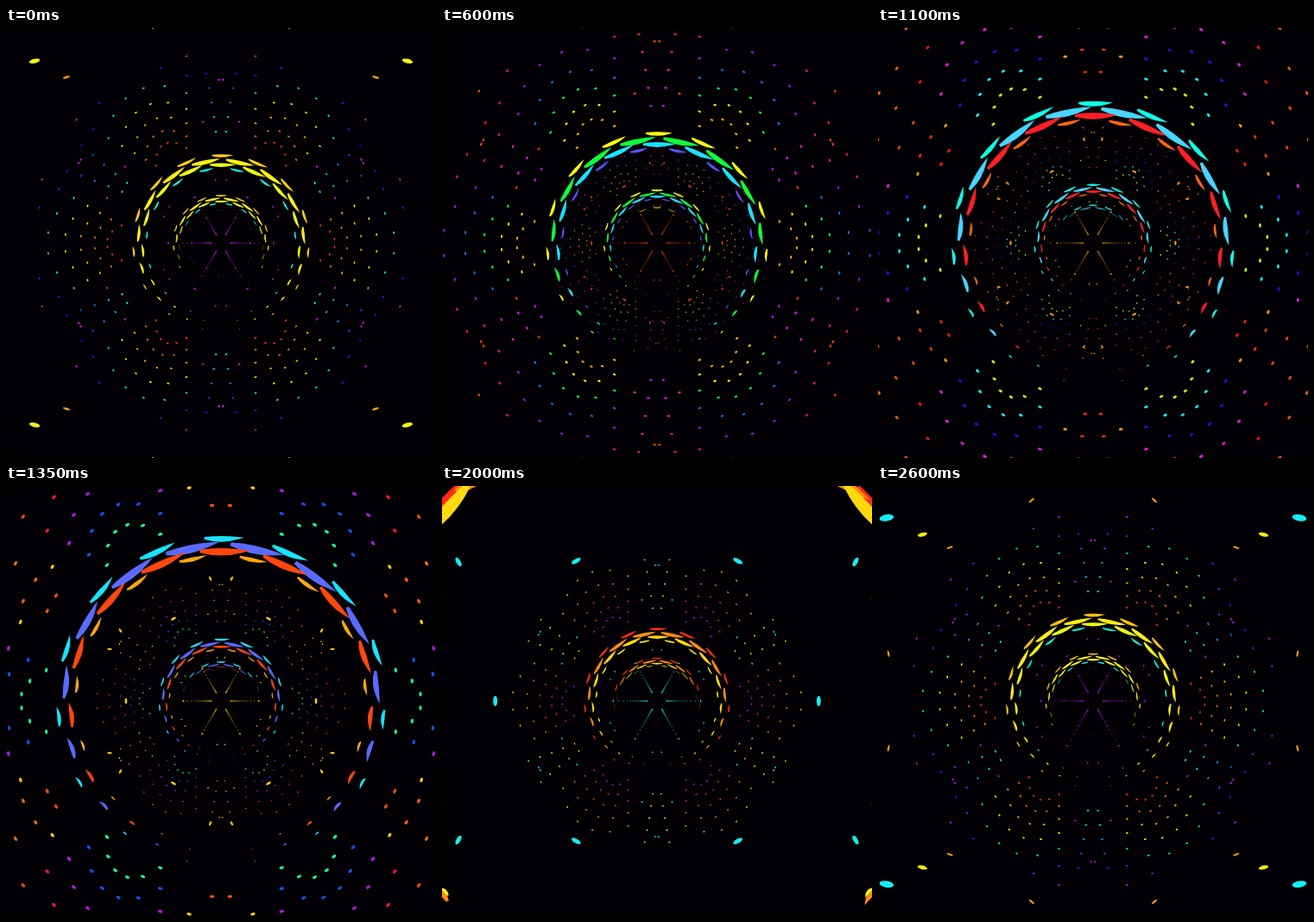
Animation of 498 by 498 pixels, one loop 2650 ms. Source, as an HTML page with a canvas:

```html
<!DOCTYPE html>
<html lang="en">
<head>
<meta charset="utf-8">
<title>Neon tunnel</title>
<style>
html, body { margin: 0; width: 100%; height: 100%; overflow: hidden; background: #020004; }
canvas { display: block; width: 498px; height: 498px; }
</style>
</head>
<body>
<canvas id="stage" width="498" height="498"></canvas>
<script>
const ctx = document.getElementById('stage').getContext('2d');
const LOOP = 2650, STEP = 50, MID = 249, RAD = Math.PI / 180;
const clamp = v => Math.max(0, Math.min(1, v));
const zoom = (far, dist) => (far / dist) ** .9;

// Key points: [ms, hue]
const ringHues = [[0, 48], [800, 66], [1100, 174], [1700, 205], [1860, 358], [2650, 408]];
const dotHues = [[0, 292], [350, 358], [1100, 396], [1600, 420], [2000, 542], [2650, 652]];

function hueAt(keys, t) {
  const i = keys.findIndex(k => k[0] > t);
  const [t0, h0] = keys[i - 1], [t1, h1] = keys[i];
  return h0 + (h1 - h0) * (t - t0) / (t1 - t0);
}
const wrap = t => ((t % LOOP) + LOOP) % LOOP;
const dotColour = t => `hsl(${hueAt(dotHues, wrap(t))} 92% 52%)`;
function ringColour(time) {
  const t = wrap(time);
  const pale = Math.exp(-(((t - 1620) / 170) ** 2));
  return `hsl(${hueAt(ringHues, t)} 100% ${53 + 22 * pale}%)`;
}

// Four nested layers, alternately offset by half a dash.
const rings = Array.from({ length: 4 }, (_, i) => {
  const bell = Math.sin(Math.PI * (i + .45) / 3.6);
  return {
    r: 102 * .947 ** i, far: 2712 - 43 * i, first: 12 * (i % 2),
    span: 8 + 9.5 * bell, weight: .026 + .024 * bell, lead: 380 * i
  };
});

// r: radius at time 0; far: distance at time 0; born: distance where it appears.
const dots = [];
function addDot(r, far, angle, lag, opts = {}) {
  dots.push({ r, far, angle, lag, len: 8600, wide: 5200, tilt: 0, born: 5500, ...opts });
}

// Petals: curved rows across each arm
for (let row = 0; row < 7; row++) {
  const r = 220 * .9 ** row, edge = 30 - Math.asin(40 / r) / RAD;
  const count = Math.min(row + 1, 3), born = row < 2 ? 3500 : 5500;
  for (let i = 0; i < count; i++) {
    const f = 1 - .4 * i;
    addDot(r * (1.13 - .13 * f * f), 2900, edge * f, 350 * row, { born });
  }
}

// Pairs between the petals
for (let i = 0; i < 5; i++) addDot(197 - 17 * i, 2900, 25 + .6 * i, 300 + 90 * i);
addDot(189, 2860, 29.3, 0);
addDot(142, 2900, 21.5, 0);

// Large dashes
const spoke = { r: 61, far: 2807 };
addDot(spoke.r, spoke.far, 0, 0, { len: 9600, wide: 4000, born: 6200 });
addDot(73, 2577, 25, 0, { len: 6600, wide: 2900, tilt: 65 });
for (let i = 0; i < 3; i++)
  addDot(54.6 + 1.3 * i, 3211 - 80 * i, 13 + 2.7 * i, 1500 - 450 * i,
    { len: 4600 + 1500 * i, wide: 1400 + 1000 * i, tilt: -25 - 7 * i, born: 1000 });

const at = (r, a) => [MID + r * Math.cos(a), MID + r * Math.sin(a)];

function drawDot(d, dist, fill) {
  if (dist < 100 || dist > d.born) return;
  const r = d.r * zoom(d.far, dist);
  if (r > 375) return;
  ctx.globalAlpha = clamp((d.born - dist) / (d.born * .13));
  ctx.fillStyle = fill;
  for (let arm = 0; arm < 6; arm++) {
    for (const s of d.angle ? [-1, 1] : [1]) {
      const a = (arm * 60 + s * d.angle) * RAD;
      ctx.beginPath();
      ctx.ellipse(...at(r, a), Math.max(.9, d.len / dist / 2),
        Math.max(.65, d.wide / dist / 2), a + Math.PI / 2 + s * d.tilt * RAD, 0, 7);
      ctx.fill();
    }
  }
}

function drawRing(g, dist, colour) {
  if (dist < 100) return;
  const r = g.r * zoom(g.far, dist);
  if (r > 380) return;
  ctx.strokeStyle = ctx.fillStyle = colour;
  for (let deg = g.first; deg <= 170; deg += 24) {
    const w = Math.cos(deg * RAD / 2) ** 2;
    const thick = r * g.weight * Math.sqrt(w);
    const half = g.span * w ** .9 / 2 * RAD;
    ctx.globalAlpha = clamp((r - 40) / 6 + (w - .9) * 3);
    ctx.lineWidth = Math.max(.8, thick * .45);
    // Dashes are thickest in the middle.
    for (const s of deg ? [-1, 1] : [1]) {
      const a = (s * deg - 90) * RAD;
      ctx.beginPath();
      ctx.arc(MID, MID, r, a - half, a + half);
      ctx.quadraticCurveTo(...at(r - thick, a), ...at(r, a - half));
      ctx.fill();
      ctx.stroke();
    }
  }
}

function drawSpokes(t) {
  ctx.fillStyle = dotColour(t);
  const gap = LOOP / 4;
  for (let i = 0; i < 24; i++) {
    const dist = 4000 + i * gap - t % gap;
    const r = spoke.r * zoom(spoke.far, dist);
    ctx.globalAlpha = .3 + .3 * clamp(r / 48);
    for (let arm = 0; arm < 6; arm++) {
      ctx.beginPath();
      ctx.arc(...at(r, arm * 60 * RAD), .8, 0, 7);
      ctx.fill();
    }
  }
}

function draw(t) {
  ctx.globalAlpha = 1;
  ctx.fillStyle = '#020004';
  ctx.fillRect(0, 0, 498, 498);
  drawSpokes(t);
  for (let copy = 2; copy >= -1; copy--) {
    const shift = copy * LOOP - t;
    for (const d of dots) drawDot(d, d.far + shift, dotColour(t - d.lag));
    for (const g of rings) drawRing(g, g.far + shift, ringColour(t + g.lead));
  }
}

const start = performance.now();
function tick(now) {
  const t = Math.max(0, now - start) % LOOP;
  draw(Math.floor(t / STEP) * STEP);
  requestAnimationFrame(tick);
}
draw(0);
requestAnimationFrame(tick);
</script>
</body>
</html>
```
